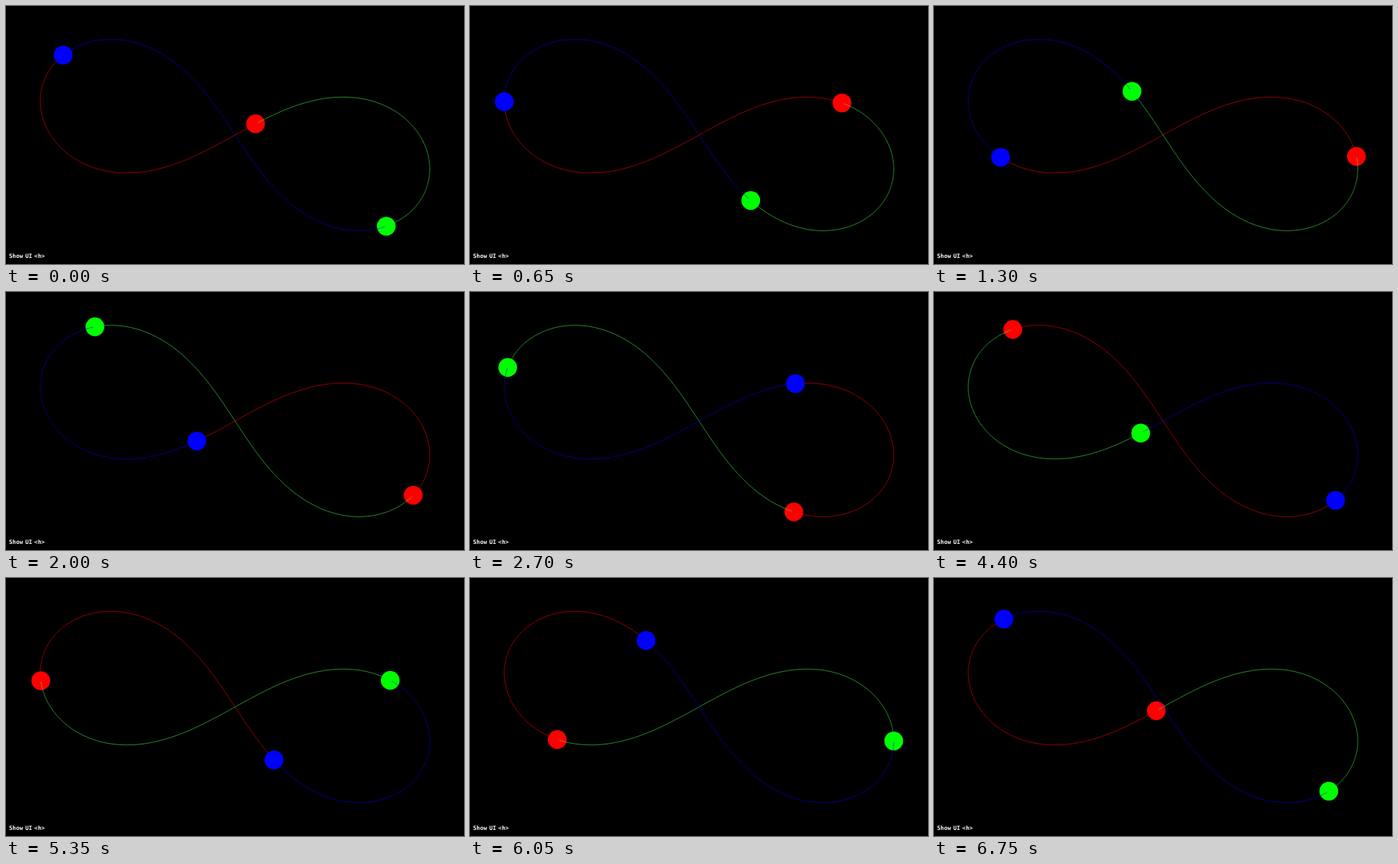
Write an HTML page with a canvas that moves like this. It is 600 px wide and 338 px high and loops after 6800 ms.

```html
<!DOCTYPE html>
<html lang="en">
<head>
<meta charset="utf-8">
<title>Three-body figure eight</title>
<style>
  html, body { margin: 0; width: 100%; height: 100%; overflow: hidden; background: #000; }
  canvas { display: block; position: absolute; left: 0; top: 0; }
  .hint {
    position: absolute; left: 4px; top: 323px;
    font: bold 7.5px/10px "DejaVu Sans Mono", monospace;
    letter-spacing: 0.1px; word-spacing: -1.9px;
    color: #fff; white-space: pre;
  }
</style>
</head>
<body>
<canvas id="stage" width="600" height="338"></canvas>
<div class="hint">Show UI &lt;h&gt;</div>
<script>
const LOOP = 6800, TICK = 50;
const PERIOD = 6.32591398, STEPS = 6000;
const SCALE = 241, TILT = -0.004, RADIUS = 12.3;
const TRAIL = PERIOD / 3 - 0.012;

// Orbit time of the red body; 0 is its crossing of the centre along the steep branch.
const CLOCK = [
  [0, -3.0624], [1300, -1.8787], [2700, -0.6], [3350, 0.004],
  [4400, 0.946], [5350, 1.826], [6750, 3.13]
];

const BODIES = [
  { fill: "#f00", trail: "rgba(255,0,0,0.56)", lead: 0 },
  { fill: "#0f0", trail: "rgba(70,230,80,0.58)", lead: PERIOD / 3 },
  { fill: "#00f", trail: "rgba(0,0,255,0.5)", lead: 2 * PERIOD / 3 }
];

function toStage({ x, y }) {
  const c = Math.cos(TILT), s = Math.sin(TILT);
  return [300 + SCALE * (x * c - y * s), 169 + SCALE * (x * s + y * c)];
}

// All three bodies follow one closed curve, so one body's path is enough.
function orbit() {
  const vx = 0.347111, vy = 0.532728, dt = PERIOD / STEPS;
  const bodies = [
    { x: 0, y: 0, vx: -2 * vx, vy: -2 * vy },
    { x: -1, y: 0, vx, vy },
    { x: 1, y: 0, vx, vy }
  ];
  const kick = h => {
    for (const a of bodies) for (const b of bodies) {
      if (a === b) continue;
      const dx = b.x - a.x, dy = b.y - a.y;
      const pull = h / Math.hypot(dx, dy) ** 3;
      a.vx += dx * pull;
      a.vy += dy * pull;
    }
  };
  const path = [];
  for (let i = 0; i < STEPS; i++) {
    path.push(toStage(bodies[0]));
    kick(dt / 2);
    for (const b of bodies) { b.x += b.vx * dt; b.y += b.vy * dt; }
    kick(dt / 2);
  }
  return path;
}

const path = orbit();
const ctx = document.getElementById("stage").getContext("2d");

function place(time) {
  const i = Math.round(time / PERIOD * STEPS) % STEPS;
  return path[(i + STEPS) % STEPS];
}

function orbitTime(ms) {
  let i = 1;
  while (i < CLOCK.length - 1 && ms > CLOCK[i][0]) i++;
  const [t0, p0] = CLOCK[i - 1], [t1, p1] = CLOCK[i];
  return p0 + (p1 - p0) * (ms - t0) / (t1 - t0);
}

function drawBody({ fill, trail, lead }, time) {
  const now = time + lead, segments = 220;
  ctx.beginPath();
  for (let k = 0; k <= segments; k++) {
    ctx.lineTo(...place(now - TRAIL * k / segments));
  }
  ctx.strokeStyle = trail;
  ctx.lineWidth = 1;
  ctx.stroke();

  ctx.beginPath();
  ctx.arc(...place(now), RADIUS, 0, 2 * Math.PI);
  ctx.fillStyle = fill;
  ctx.fill();
}

function draw(ms) {
  ctx.fillStyle = "#000";
  ctx.fillRect(0, 0, 600, 338);
  const time = orbitTime(ms);
  for (const body of BODIES) drawBody(body, time);
}

const start = performance.now();
let shown = -1;
function loop() {
  const ms = Math.floor((performance.now() - start) % LOOP / TICK) * TICK;
  if (ms !== shown) draw(shown = ms);
  requestAnimationFrame(loop);
}
loop();
</script>
</body>
</html>
```
